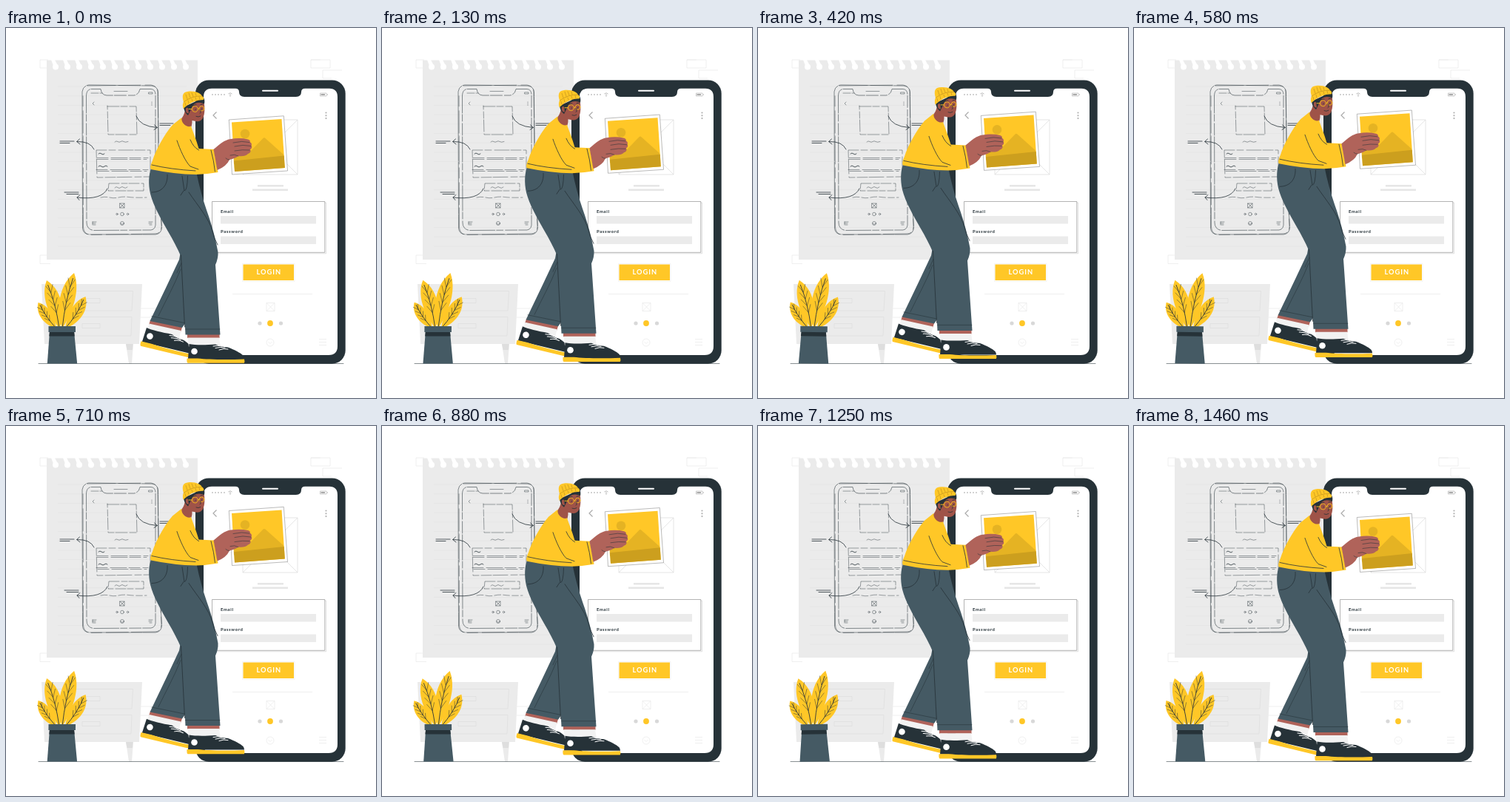
Write an HTML page that moves like this. It is 500 px wide and 500 px high and loops after 1.5 s.

```html
<!DOCTYPE html>
<html lang="en">
<head>
<meta charset="utf-8">
<title>Login screen design</title>
<style>
html, body { margin: 0; width: 100%; height: 100%; overflow: hidden; background: #fff; }
svg { display: block; width: 100vw; height: 100vh; }
.ink { fill: none; stroke: #263238; stroke-linecap: round; stroke-linejoin: round; stroke-width: .8; }
.thin { stroke-width: .55; }
.hair { stroke-width: .45; }
.pale { fill: none; stroke: #e4e4e4; stroke-width: .6; }
.dark { fill: #263238; }
.slate { fill: #455a64; }
.sun { fill: #ffc727; }
.skin { fill: #b0635a; }
.face { fill: #9f5348; }
.grey { fill: #ebebeb; }
text { font-family: Lato, Inter, sans-serif; font-weight: 700; }
</style>
</head>
<body>
<svg viewBox="0 0 500 500" xmlns="http://www.w3.org/2000/svg">
  <defs>
    <g id="shoe">
      <path class="dark" d="M.5 0C8 1.5 22 1.5 36 .5C41 2.500 46 4 53 4.500C62 8 70 12 73.500 15.500Q75 17.500 75 20H-1Z"/>
      <path class="sun" d="M-2.500 19.500H12C26 21 50 21.500 75 20.500Q76 24 74.800 25.700H-1.500Q-3 25 -2.500 19.500Z"/>
      <circle cx="7.500" cy="10" r="4.300" fill="#fff"/>
      <path class="ink" style="stroke:#fff;stroke-width:1" d="M33 3Q39 1.500 45 3M36 5.500Q43 3.500 49 5M41 8Q47 5.500 53 7"/>
    </g>
  </defs>

  <!-- guide marks -->
  <path class="pale" d="M57 43H46V54H57M412 43H438V54H412ZM454 57H428V68H440M60 307H46V318.500H60M412 43H425M181 379H205V391H181"/>

  <!-- torn sheet -->
  <path class="grey" d="M55 43.500H259V313H55Z"/>
  <g id="holes" fill="#fff"></g>
  <g id="rules" stroke="#e1e1e1" stroke-width=".6"></g>

  <!-- wireframe -->
  <g class="ink thin">
    <path stroke-dasharray="70 1.500 32 1" d="M112 77L197 78Q205 79 205.500 87L206 200L210.500 268Q211 278 202 279H113Q104 279 103.500 270L103 86Q104 78 112 77Z"/>
    <path class="hair" stroke-dasharray="38 4 30 6 14 5" d="M110 78L196 77Q206 79 205 88L207 190L210 269Q209 279 200 278L113 279.500Q105 278 104.500 269L104 87"/>
    <path stroke-dasharray="34 2 16 3 9 2" d="M115 82.500H128Q129 90.500 136 91H173Q180 90 181 82.500H196Q202 83 202 90V262Q203 272 196 273L118 273.500Q109 272 109 263L108.500 91Q109 83 115 82.500Z"/>
  </g>
  <g class="ink hair">
    <path d="M146 85.500H164M115 88H125M127 88H130M193 87H198V89H193ZM119 100L117 102L119 104M197 100V100.500M197 102V102.500M197 104V104.500"/>
    <path stroke-dasharray="16 2 9 3" d="M137 106H176L177 144H138L137 105"/>
    <path d="M147 154Q149 152 151 153.500T155 153.500T159 153.500T165 153.500"/>
    <path stroke-dasharray="14 3 9 4 20 2" d="M122 165H195V201L123 202Z"/>
    <path stroke-dasharray="15 4 22 3" d="M123 175.500H192M123 177.500H190M122 191.500H192M124 193.500H190"/>
    <path d="M125 170Q127 168 129 170T133 170M125 187Q127 185 129 187T133 187T137 187" stroke-width=".8"/>
    <path stroke-dasharray="14 3 8 2" d="M139 210H186V220H138Z"/>
    <path d="M147 216Q149 213.500 151 215.500T155 215.500T159 215.500T164 215"/>
    <path stroke-dasharray="9 3" d="M128 229Q134 227.500 140 229T152 229T166 228.500T190 229"/>
    <path d="M154 237H160V243H154ZM154 237L160 243M160 237L154 243"/>
    <circle cx="150" cy="251.500" r="1.200"/><circle cx="157" cy="251.500" r="2.300"/><circle cx="164.500" cy="251.500" r="1.200"/>
    <path d="M117 262H122M117 264H121M118 266H121M117 262V266M193 262H198M193 264H197M194 266H197M155 264L157 265.500L159 264"/>
    <circle cx="157" cy="264" r="2.500"/>
  </g>
  <g class="ink">
    <path d="M119 164Q114 153 96 153.500M99.500 150L95.500 153.500L100 157M176 119Q181 133 204 134.500M200.500 131L204.500 134.500L200 137.500M137 217Q130 233 96 229M100 225.500L96 229L99 232.500"/>
    <path d="M73 153H92M73 155.500H86M79 222H98M82 224.500H98M208 129H226M208 131.500H222"/>
  </g>

  <!-- cabinet -->
  <path class="grey" d="M48 346H184L180 427H52Z"/>
  <path class="grey" d="M162 427H172L170 453.500H166Z"/>
  <path fill="#dedede" d="M162 427H171.500L171 435H163.500Z"/>
  <path fill="none" stroke="#dadada" stroke-width=".6" d="M57 355.500H171.500L170 382H58ZM58 390.500H170L169 416H59ZM103 365.500H127V371.500H103ZM103 399.500H127V405.500H103Z"/>
  <path class="ink thin" d="M44 453.500H456"/>

  <!-- device -->
  <rect class="dark" x="256" y="70.500" width="202.700" height="383.200" rx="18"/>
  <path fill="#fff" d="M278 81.800H310Q315 82 315 86.500Q315 93 322 93H392Q399 93 399 86.500Q399 82 404 81.800H437Q448 82 448 93V430Q448 442 436 442H279Q267 442 267 430V93Q267 82 278 81.800Z"/>
  <path d="M347 84.700H367" stroke="#fff" stroke-width="2" stroke-linecap="round"/>
  <path d="M279 90H296" stroke="#c4c4c4" stroke-width="2" stroke-linecap="round" stroke-dasharray="0 4"/>
  <path d="M300.500 89Q303 86.500 305.500 89M301.800 90.500Q303 89.300 304.200 90.500" fill="none" stroke="#aaa" stroke-width=".8"/>
  <circle cx="303" cy="92" r=".7" fill="#aaa"/>
  <path d="M424.500 88H433V92H424.500ZM434.500 89V91" fill="none" stroke="#aaa" stroke-width=".6"/>
  <path d="M425.500 89H431V91H425.500Z" fill="#aaa"/>
  <path d="M284.500 113.500L280 118L284.500 122.500" fill="none" stroke="#aaa" stroke-width="1.200"/>
  <g fill="#b0b0b0"><circle cx="432.500" cy="114.500" r="1.100"/><circle cx="432.500" cy="118.300" r="1.100"/><circle cx="432.500" cy="122.100" r="1.100"/></g>
  <path d="M320 124H394V198H320ZL394 198M394 124L320 198" fill="none" stroke="#d6d6d6" stroke-width=".6"/>
  <path d="M340 212H375V214.600H340ZM333 217.500H381V220H333Z" fill="#e6e6e6"/>
  <path d="M280 236H432.500V304.800H280Z" fill="#fff" stroke="#ccc" stroke-width=".6"/>
  <path d="M278.500 234.500H430.800V303.300H278.500Z" fill="#fff" stroke="#666" stroke-width=".5"/>
  <text class="dark" x="290" y="249.800" font-size="6" letter-spacing=".6">Email</text>
  <text class="dark" x="290" y="277.300" font-size="6" letter-spacing=".6">Password</text>
  <path class="grey" d="M290 254H419V264.500H290ZM290 281.500H419V292H290Z"/>
  <path d="M319.500 318.500H390V342.500H319.500Z" fill="none" stroke="#eee" stroke-width=".6"/>
  <path class="sun" d="M320.500 319.500H389V341H320.500Z"/>
  <text x="355.400" y="333.400" font-size="9.300" letter-spacing="1" text-anchor="middle" fill="#fff">LOGIN</text>
  <path class="pale" d="M306 359.500H414M352 371.500H363V382.500H352ZL363 382.500M363 371.500L352 382.500M354.500 424L357 426.500L359.500 424M423 420.500H433M423 424.500H433M423 428.500H433"/>
  <circle class="pale" cx="357" cy="425" r="5"/>
  <g fill="#d8d8d8"><circle cx="343" cy="399" r="2.600"/><circle cx="371.500" cy="399" r="2.600"/></g>
  <circle class="sun" cx="357" cy="399" r="3.900"/>

  <!-- designer -->
  <g id="man">
    <path d="M301.300 124L375.300 118.800L380.500 193L305.500 198Z" fill="#fff" stroke="#777" stroke-width=".5"/>
    <path class="sun" d="M305 127.500L372.500 123L376.800 189L309 194Z"/>
    <circle cx="323" cy="143" r="6.300" fill="#e5b323"/>
    <path fill="#e5b323" d="M307.500 173L322 160L331 166L347.500 149Q349 147.500 351 149.500L375 171L376 180L308 184Z"/>
    <path fill="#cc9f1e" d="M308 179.500L375.700 172.500L376.800 189L309 194Z"/>

    <path class="skin" d="M195 395L238 404.500L236 411L193 401Z"/>
    <path d="M193.500 399.500L236.500 409L234 419L190.500 408Z" fill="#f2f2f2"/>
    <use href="#shoe" transform="translate(189.500 405) rotate(13.500)"/>
    <path class="slate" d="M237 296L234 313L217 349L194.500 396L238 405L243 398L246 310Z"/>
    <path class="skin" d="M245 413H288.500V419H245Z"/>
    <path d="M245.500 418.500H288L290 431H247Z" fill="#f2f2f2"/>
    <use href="#shoe" transform="translate(247 427)"/>
    <path class="slate" d="M196 190C193 198 192 210 195 224C199 240 209 257 219 275C226 287 232 298 236.500 309C239 342 241 380 242.500 414.500H289.500L283 320Q287 311 286.500 303C284 289 279 268 271 246C266 231 261 214 257.500 196Z"/>
    <g class="ink">
      <path d="M236.500 307L241.500 404M197 222C211 222 219 212 218 198M238 200L241 220Q245 220 245.500 200M240 220L236 226M247 222C259 240 275 258 279 275Q281 284 286 293"/>
      <path class="thin" d="M236 326C228 347 215 370 206 389M237 318L231 331M197 389.500L241 398.500M242.500 407H289"/>
    </g>

    <path class="face" d="M243 105L267 97C269 107 269 116 266 122Q262 128 254 125.500L251.500 125Q252 132 248 138L235 125C241 119 242 112 243 105Z"/>
    <path class="dark" d="M240 107L267 94Q269 97 268 102.500Q260 99 254 103Q251 106 249 112L246 118Q241 114 240 107Z"/>
    <path class="sun" d="M239.500 109Q238 103 240 100Q236 87 245 85.900C256 84.500 263 88 265 92Q268 94 267 97Q252 97 239.500 109Z"/>
    <path class="ink hair" style="stroke:#9a781c" d="M240 100Q252 91 265 92M243 90L245 96M247 88L249 94M251 87.500L253 92.500M256 88L257 91.500M242 101L243 105M246 98L247 102M251 96L252 99M256 94L257 97M261 93L262 96.500"/>
    <path class="face" d="M246 108Q242 107 243 112Q244 116 247 115Z"/>
    <g class="ink">
      <g style="stroke:#f0b420;stroke-width:1"><circle cx="255.500" cy="109.500" r="4"/><circle cx="264.500" cy="108.800" r="3.300"/><path d="M247 109.500H251.500M259.500 109H261.200"/></g>
      <path d="M253 104.500L257 103.800M263 103.500L266 103M256 109.500V110.500M264.500 109V110M262 110Q264.500 114 262 115.500M257 119.500Q260 121 263 119"/>
    </g>
    <path class="sun" d="M237.500 121C236 130 246 135 250 132.500C253 141 257 151 260.500 163L281 164L286.500 195Q272 197.500 257 198Q227 197.500 196 191Q193.500 188.500 198 179C202 166 213 145 225 131Z"/>
    <g class="ink">
      <path d="M231 152C235 164 242 180 249 187L260 191M249 151Q253 161 260.500 165M197 185Q222 191 256 193M277 165Q281 180 282.500 194"/>
    </g>
    <path class="skin" d="M280.500 164C289 157 295 151 304 150Q316 148 327 150.500Q331 152 329.500 154Q333 156 331.500 159Q333.500 162 330 164Q332 168 327 170Q323 174 314 173Q310 176 302 178Q298 187 285.500 192Z"/>
    <path class="ink thin" d="M307 155Q319 152 329 154.500M309 160Q320 157 331 159.500M309 166Q320 164 329 165M314 173Q309 170 303 172M302 178Q299 178 297 176"/>
  </g>

  <!-- plant -->
  <g id="plant">
    <g id="leaves"></g>
    <path class="slate" d="M59 410H92L96.200 453.500H55.800Z"/>
    <path class="dark" d="M59 410H92L92.700 416.500H58.300Z"/>
    <path class="slate" d="M57.500 403H94V411H57.500Z"/>
  </g>
</svg>
<script>
const $ = id => document.getElementById(id);
const LOOP = 1500, LIFT = 10, SWAY = 1;

// A leaf from base to tip, drawn along its own axis
function leaf(bx, by, tx, ty, w, bend) {
  const len = Math.hypot(tx - bx, ty - by);
  const deg = Math.atan2(ty - by, tx - bx) * 180 / Math.PI;
  let veins = '';
  for (let i = 0; i < 4; i++) {
    const u = .32 + i * .14, x = u * len, y = 2 * u * (1 - u) * bend;
    const r = w * (.6 - Math.abs(u - .5) * .5);
    veins += `M${x + len * .15} ${y + r}L${x} ${y}L${x + len * .15} ${y - r}`;
  }
  const near = s => `${len * .2} ${bend / 2 + s * w * .8}`;
  const far = s => `${len * .68} ${bend / 2 + s * w * 1.8}`;
  return `<g transform="translate(${bx} ${by}) rotate(${deg})">
    <path class="sun" d="M0 0C${near(1)} ${far(1)} ${len} 0C${far(-1)} ${near(-1)} 0 0Z"/>
    <path class="ink" d="M0 0Q${len / 2} ${bend} ${len * .9} 0"/>
    <path class="ink hair" d="${veins}"/></g>`;
}

$('leaves').innerHTML =
  leaf(68, 406, 43.5, 371, 7.5, -3) +
  leaf(80, 406, 107.5, 363, 8.5, 4) +
  leaf(72, 406, 55, 341, 10, 4) +
  leaf(76, 406, 92, 331, 10, -4);

let holes = '', rules = '';
for (let x = 67; x < 255; x += 16) {
  holes += `<circle cx="${x}" cy="52.500" r="4"/><path d="M${x - 6} 43H${x - 1}L${x + 3} 51H${x - 3}Z"/>`;
}
for (let y = 79; y < 300; y += 12.7) rules += `<path d="M70 ${y}H244"/>`;
$('holes').innerHTML = holes;
$('rules').innerHTML = rules;

// Linear wave: 0 at the ends, 1 in the middle
const rise = p => 1 - Math.abs(2 * p - 1);
// Linear wave: 0, 1, 0, -1, 0
const swing = p => 2 * rise((p + .25) % 1) - 1;

function draw(ms) {
  const p = (ms % LOOP) / LOOP;
  $('man').setAttribute('transform', `translate(0 ${-LIFT * rise(p)})`);
  $('plant').setAttribute('transform', `rotate(${SWAY * swing(p)} 76 392)`);
}

const start = performance.now();
function tick() {
  draw(performance.now() - start);
  requestAnimationFrame(tick);
}
draw(0);
requestAnimationFrame(tick);
</script>
</body>
</html>
```
